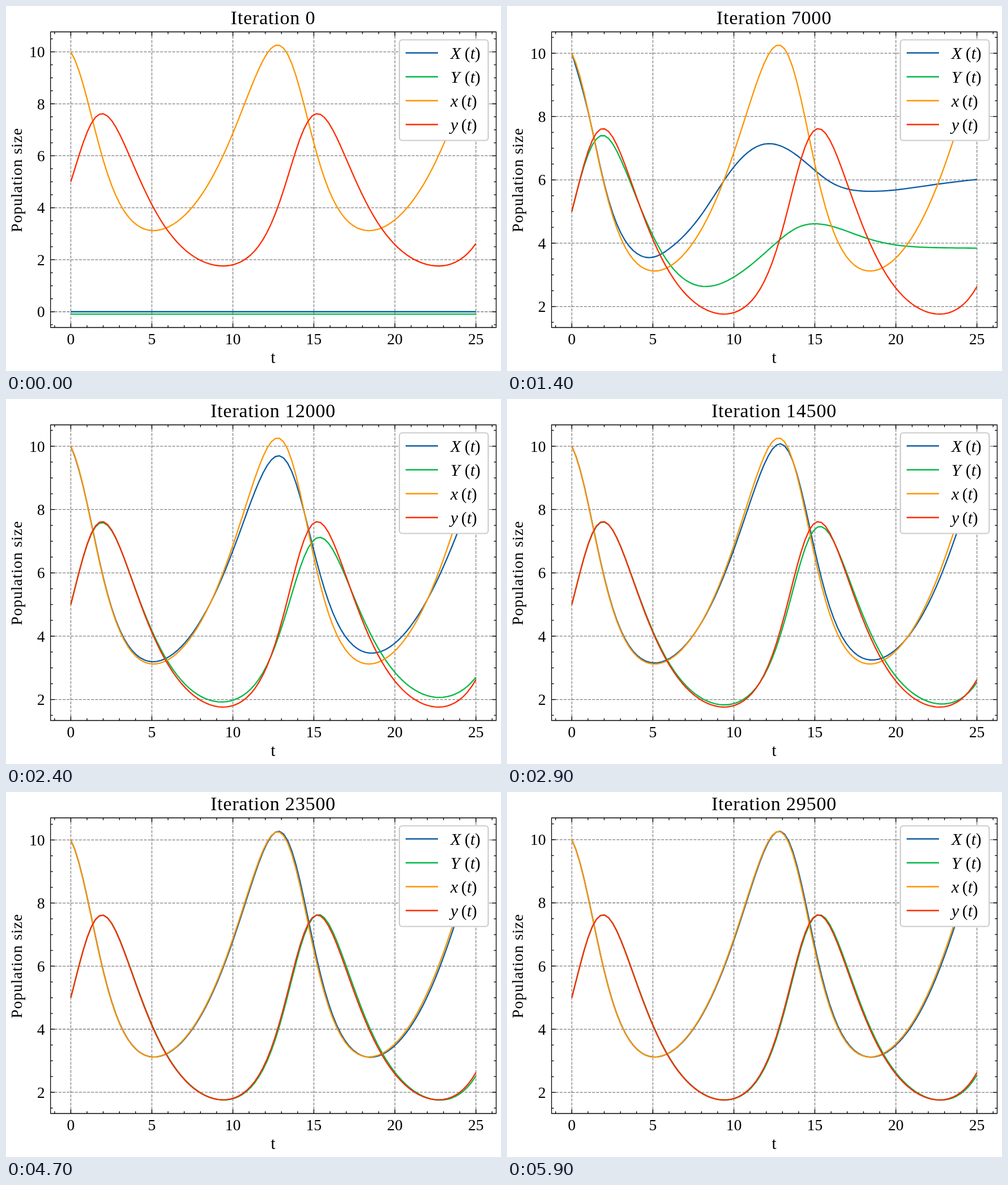
Recreate the animation shown at these times as an HTML page with a canvas. Size 872 by 642 pixels, loop 6 s.

```html
<!DOCTYPE html>
<html lang="en">
<head>
<meta charset="utf-8">
<title>Population size</title>
<style>
html, body { margin: 0; width: 872px; height: 642px; overflow: hidden; background: #fff; }
canvas { display: block; }
</style>
</head>
<body>
<canvas id="plot" width="872" height="642"></canvas>
<script>
const ctx = document.getElementById('plot').getContext('2d');
const SERIF = '"Liberation Serif", "Times New Roman", serif';
const COLORS = ['#0C5DA5', '#00B945', '#FF9500', '#FF2C00'];
const LEFT = 78.5, RIGHT = 863.5, TOP = 45.5, BOTTOM = 565.5;
const N = 100, STEP = 25 / (N - 1);
const times = Array.from({ length: N }, (_, i) => i * STEP);

// Exact predator-prey solution, integrated with RK4.
const slope = ([x, y]) => [x * (0.4 - 0.1 * y), y * (0.1 * x - 0.6)];
const move = (p, d, h) => [p[0] + d[0] * h, p[1] + d[1] * h];
function rk4(p, h) {
  const a = slope(p), b = slope(move(p, a, h / 2));
  const c = slope(move(p, b, h / 2)), d = slope(move(p, c, h));
  return p.map((v, i) => v + (a[i] + 2 * b[i] + 2 * c[i] + d[i]) * h / 6);
}
const exact = [[10, 5]];
while (exact.length < N) exact.push(rk4(exact.at(-1), STEP));
const exactX = exact.map(p => p[0]), exactY = exact.map(p => p[1]);

// Natural cubic spline through (knots, v), sampled at all times.
const knots = [0, 1, 2, 3, 4, 5, 6, 8, 10, 12, 14, 16, 18, 20, 22.5, 25];
function spline(v) {
  const n = knots.length, c = Array(n).fill(0), m = Array(n).fill(0);
  for (let i = 1; i < n - 1; i++) {
    const a = knots[i] - knots[i - 1], b = knots[i + 1] - knots[i];
    const pivot = 2 * (a + b) - a * c[i - 1];
    c[i] = b / pivot;
    m[i] = (6 * ((v[i + 1] - v[i]) / b - (v[i] - v[i - 1]) / a) - a * m[i - 1]) / pivot;
  }
  for (let i = n - 2; i > 0; i--) m[i] -= c[i] * m[i + 1];
  return times.map(t => {
    let i = 0;
    while (i < n - 2 && t > knots[i + 1]) i++;
    const h = knots[i + 1] - knots[i], q = (t - knots[i]) / h, p = 1 - q;
    return p * v[i] + q * v[i + 1] + ((p ** 3 - p) * m[i] + (q ** 3 - q) * m[i + 1]) * h * h / 6;
  });
}

// Nearly converged fit: the exact solution, slightly late and damped.
function nearExact(lag, damp) {
  return [6, 4].map((centre, k) => exact.map((p, i) => {
    const t = times[i], late = p[k] - slope(p)[k] * lag * t;
    return centre + (late - centre) * (1 - damp * Math.min(1, (t / 12) ** 1.5));
  }));
}

// Learned curves by step; decay sets how fast each stage slows down.
const stages = [
  { at: 0, decay: 0.05, curves: [times.map(() => 0), times.map(() => -0.09)] },
  { at: 5, decay: 0.8, curves: [
    spline([9.95, 8.1, 6.03, 4.85, 4.21, 4.22, 4.5, 5.17, 5.61, 5.86, 6, 6.09, 6.15, 6.19, 6.225, 6.24]),
    spline([4.98, 6.53, 6.95, 6.23, 5.21, 4.27, 3.74, 3.545, 3.66, 3.76, 3.825, 3.86, 3.89, 3.91, 3.925, 3.94])] },
  { at: 14, decay: 0.6, curves: [
    spline([10, 8.17, 5.88, 4.35, 3.68, 3.555, 3.82, 4.9, 6.41, 7.14, 6.73, 5.92, 5.645, 5.685, 5.86, 6.015]),
    spline([5, 6.8, 7.4, 6.67, 5.42, 4.24, 3.36, 2.64, 2.93, 3.73, 4.51, 4.54, 4.19, 3.945, 3.86, 3.845])] },
  { at: 19, decay: 0.1, curves: [
    spline([10, 8.19, 5.85, 4.24, 3.5, 3.31, 3.48, 4.65, 6.57, 8.4, 7.84, 5.5, 4.23, 4.41, 5.9, 7.5]),
    spline([5, 6.87, 7.52, 6.78, 5.45, 4.22, 3.28, 2.3, 2.31, 3.28, 5.34, 5.99, 4.57, 3.26, 2.7, 3.22])] },
  { at: 29, decay: 0.05, curves: nearExact(0.007, 0.045) },
  { at: 47, decay: 0.5, curves: nearExact(0.0045, -0.003) },
  { at: 59, decay: 0.5, curves: nearExact(0.0035, -0.001) }
];

function learned(step) {
  let i = 0;
  while (i < stages.length - 2 && step >= stages[i + 1].at) i++;
  const a = stages[i], b = stages[i + 1];
  const u = (step - a.at) / (b.at - a.at);
  const w = (1 - a.decay ** u) / (1 - a.decay);
  return a.curves.map((curve, k) => curve.map((v, j) => v + (b.curves[k][j] - v) * w));
}

function text(str, x, y, size, align = 'center', spacing = 0, style = '') {
  ctx.font = `${style} ${size}px ${SERIF}`;
  ctx.textAlign = align;
  ctx.letterSpacing = spacing + 'px';
  ctx.fillText(str, x, y);
}

function line(x1, y1, x2, y2) {
  ctx.beginPath();
  ctx.moveTo(x1, y1);
  ctx.lineTo(x2, y2);
  ctx.stroke();
}

function pen(color, width, dash = []) {
  ctx.strokeStyle = color;
  ctx.lineWidth = width;
  ctx.setLineDash(dash);
}

const px = t => LEFT + (RIGHT - LEFT) * (t + 1.25) / 27.5;

function drawLegend() {
  pen('#ccc', 2.2);
  ctx.fillStyle = '#fff';
  ctx.beginPath();
  ctx.roundRect(693, 59.5, 156.5, 177, 5);
  ctx.fill();
  ctx.stroke();
  ctx.fillStyle = '#000';
  ['X', 'Y', 'x', 'y'].forEach((name, i) => {
    const y = 82.5 + 42 * i, x = i < 2 ? 808 : 802;
    pen(COLORS[i], 2.3);
    line(704, y, 761, y);
    text(name, 783, y + 10, 30, 'left', 0, 'italic');
    text('(', x, y + 10, 29, 'left');
    text('t', x + 10, y + 10, 29, 'left', 0, 'italic');
    text(')', x + 18, y + 10, 29, 'left');
  });
}

function draw(step) {
  const curves = [...learned(step), exactX, exactY];
  const all = curves.flat(), min = Math.min(...all), max = Math.max(...all);
  const pad = (max - min) * 0.05, low = min - pad, high = max + pad;
  const py = v => BOTTOM - (BOTTOM - TOP) * (v - low) / (high - low);

  ctx.fillStyle = '#fff';
  ctx.fillRect(0, 0, 872, 642);
  ctx.fillStyle = '#000';

  const firstY = Math.ceil(low * 2) / 2;
  pen('rgba(0,0,0,0.5)', 1.3, [5, 2.15]);
  for (let t = 0; t <= 25; t += 5) line(px(t), BOTTOM, px(t), TOP);
  for (let v = Math.ceil(low / 2) * 2; v < high; v += 2) line(LEFT, py(v), RIGHT, py(v));

  ctx.lineJoin = 'round';
  curves.forEach((curve, k) => {
    pen(COLORS[k], 2.3);
    ctx.beginPath();
    curve.forEach((v, i) => ctx.lineTo(px(times[i]), py(v)));
    ctx.stroke();
  });

  pen('#000', 1.3);
  for (let t = -1; t <= 26; t++) {
    const x = px(t), major = t % 5 === 0, len = major ? 7.5 : 4;
    line(x, BOTTOM, x, BOTTOM - len);
    line(x, TOP, x, TOP + len);
    if (major) text(t, x, 594.5, 27.5);
  }
  for (let v = firstY; v < high; v += 0.5) {
    const y = py(v), major = v % 2 === 0, len = major ? 7.5 : 4;
    line(LEFT, y, LEFT + len, y);
    line(RIGHT, y, RIGHT - len, y);
    if (major) text(Math.abs(v), 68.5, y + 9.5, 27.5, 'right');
  }
  ctx.strokeRect(LEFT, TOP, RIGHT - LEFT, BOTTOM - TOP);

  text('Iteration ' + step * 500, 470.5, 32, 34, 'center', 0.8);
  text('t', 470.5, 628, 29);
  ctx.save();
  ctx.translate(28, 306);
  ctx.rotate(-Math.PI / 2);
  text('Population size', 0, 0, 27.5, 'center', 1);
  ctx.restore();
  drawLegend();
}

function tick() {
  draw(Math.floor(performance.now() % 6000 / 100));
  requestAnimationFrame(tick);
}
tick();
</script>
</body>
</html>
```
